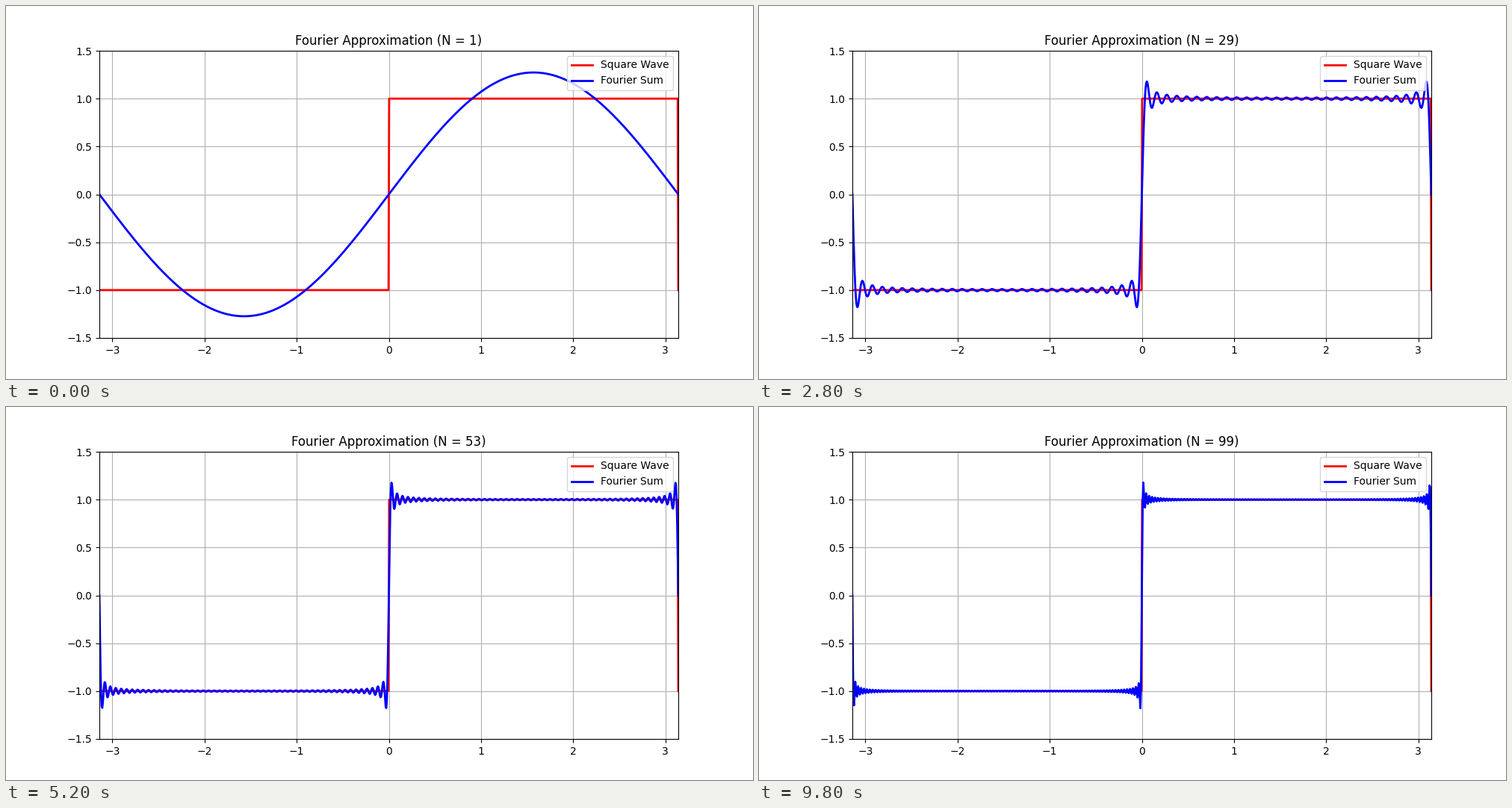
A matplotlib script for the animation above (9900 ms loop, 1000 by 500 pixels).

```python
import matplotlib.pyplot as plt
import numpy as np
from matplotlib.animation import FuncAnimation

FRAMES = 99
INTERVAL = 100  # ms

x = np.linspace(-np.pi, np.pi, 1000)
square = np.where(np.mod(x, 2 * np.pi) < np.pi, 1.0, -1.0)


def fourier_sum(terms):
    """Sum of the first odd harmonics of a unit square wave."""
    odd = 2 * np.arange(terms)[:, None] + 1
    return 4 / np.pi * (np.sin(odd * x) / odd).sum(axis=0)


fig, ax = plt.subplots(figsize=(10, 5), dpi=100)
ax.plot(x, square, color="red", lw=2, label="Square Wave")
(approx,) = ax.plot(x, fourier_sum(1), color="blue", lw=2, label="Fourier Sum")
ax.set_xlim(-np.pi, np.pi)
ax.set_ylim(-1.5, 1.5)
ax.grid(True)
ax.legend(loc="upper right")
title = ax.set_title("Fourier Approximation (N = 1)")


def update(frame):
    terms = frame + 1
    approx.set_ydata(fourier_sum(terms))
    title.set_text(f"Fourier Approximation (N = {terms})")
    return approx, title


anim = FuncAnimation(fig, update, frames=FRAMES, interval=INTERVAL, repeat=True)
plt.show()
```
